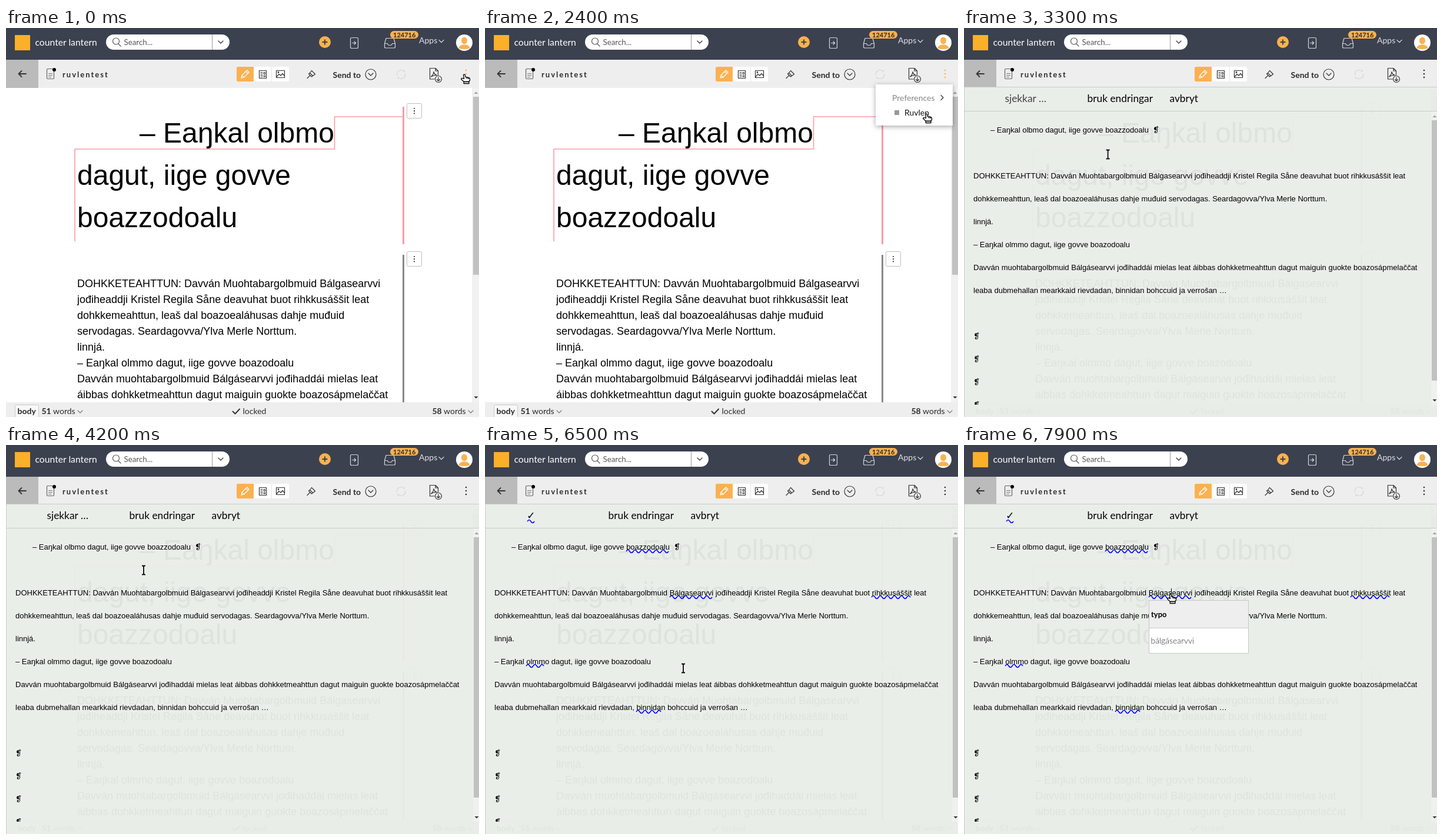
These frames come from a looping animation (804 px wide and 662 px high, 8 s). An HTML page:

```html
<!DOCTYPE html>
<html lang="se">
<head>
<meta charset="utf-8">
<title>Editor spell check</title>
<style>
html, body { margin: 0; width: 100%; height: 100%; overflow: hidden; background: #fff; }
svg { display: block; }
text { font-family: Lato, sans-serif; font-size: 14px; fill: #2b2b2b; white-space: pre; }
.line { fill: none; stroke: #333; stroke-width: 1.2; stroke-linecap: round; stroke-linejoin: round; }
.pale { stroke: #d3d5da; }
.bold { font-weight: 700; }
.page text { font: 18px "Liberation Sans", Arial, sans-serif; fill: #000; }
.page .title text { font-size: 48px; }
.check text { font: 13px "Liberation Sans", Arial, sans-serif; fill: #000; }
.check .mark { font-family: "DejaVu Sans", sans-serif; }
.check .bar { font: 13pt Lato, sans-serif; }
.menu text { fill: #858585; }
.menu rect.panel { filter: drop-shadow(0 2px 4px rgba(0,0,0,.35)); }

.timed { animation: 8s step-end infinite; }
.menu { animation-name: menu; }
.menu .first { animation-name: first; }
.menu .second { animation-name: second; }
.check { animation-name: check; }
.busy { animation-name: busy; }
.done { animation-name: done; }
.caret { animation-name: caret; }
.popup { animation-name: popup; }
.dots { animation-name: dots; }
.hand { animation-name: hand; }
.beam { animation-name: beam; }
.pulse { animation: pulse 8s ease-in-out infinite; }
.cursor { animation: move 8s linear infinite; }

@keyframes menu { 0% { visibility: hidden } 7.45% { visibility: visible } 31.2%, 100% { visibility: hidden } }
@keyframes first { 0% { fill: #858585 } 9.95% { fill: #111 } 14.95%, 100% { fill: #858585 } }
@keyframes second { 0% { fill: #858585 } 14.95%, 100% { fill: #111 } }
@keyframes check { 0% { visibility: hidden } 31.2%, 100% { visibility: visible } }
@keyframes busy { 0% { visibility: hidden } 31.2% { visibility: visible } 81.2%, 100% { visibility: hidden } }
@keyframes done { 0% { visibility: hidden } 81.2%, 100% { visibility: visible } }
@keyframes caret { 0% { visibility: hidden } 96.2%, 100% { visibility: visible } }
@keyframes popup { 0% { visibility: hidden } 97.45%, 100% { visibility: visible } }
@keyframes dots { 0% { fill: #fbb150 } 31.2%, 100% { fill: #333 } }
@keyframes hand { 0% { visibility: visible } 31.2% { visibility: hidden } 92.5%, 100% { visibility: visible } }
@keyframes beam { 0% { visibility: hidden } 31.2% { visibility: visible } 92.5%, 100% { visibility: hidden } }
@keyframes pulse { 0%, 30% { opacity: .52 } 54.4% { opacity: 1 } 79%, 100% { opacity: .52 } }
@keyframes move {
  0%, 4.5% { transform: translate(779px, 78px) }
  11.2% { transform: translate(758px, 120px) }
  15%, 15.5% { transform: translate(746px, 131px) }
  17.4%, 19.5% { transform: translate(742px, 139px) }
  21.2% { transform: translate(739px, 140px) }
  25%, 31.19% { transform: translate(750px, 145px) }
  31.2%, 32.4% { transform: translate(751px, 148px); animation-timing-function: ease-in-out }
  40% { transform: translate(249px, 214px) }
  43.7% { transform: translate(236px, 217px) }
  48.7%, 55.5% { transform: translate(234px, 213px); animation-timing-function: ease-in-out }
  63.7% { transform: translate(68px, 142px) }
  67.4% { transform: translate(78px, 136px); animation-timing-function: ease-in }
  77.4% { transform: translate(333px, 372px) }
  78.7%, 83% { transform: translate(337px, 380px); animation-timing-function: ease-in-out }
  90% { transform: translate(355px, 234px) }
  93.7%, 100% { transform: translate(351px, 253px) }
}
</style>
</head>
<body>
<svg width="804" height="662" viewBox="0 0 804 662">
  <defs>
    <path id="chevron" class="line" d="M-4-2 0 2 4-2"/>
    <g id="handle">
      <rect x=".5" y=".5" width="25" height="25" rx="2" fill="#fff" stroke="#bdbdbd"/>
      <path d="M13 9v.01M13 13.2v.01M13 17.4v.01" class="line" style="stroke-width:2.2"/>
    </g>
    <clipPath id="pageClip"><rect y="102" width="804" height="535"/></clipPath>
    <clipPath id="checkClip"><rect y="101" width="804" height="540"/></clipPath>
  </defs>
  <rect width="804" height="662" fill="#fff"/>

  <!-- document page -->
  <g class="page" clip-path="url(#pageClip)">
    <g class="title">
      <text x="227" y="195">– Eaŋkal olbmo</text>
      <text x="121" y="267">dagut, iige govve</text>
      <text x="121" y="339">boazzodoalu</text>
    </g>
    <path d="M117 363V206H558.5V151H675" fill="none" stroke="#fb9ca5" stroke-width="1.6"/>
    <path d="M675.5 134V368" stroke="#fb9ca5" stroke-width="3"/>
    <path d="M675.5 386V640" stroke="#888" stroke-width="3"/>
    <use href="#handle" x="681" y="128"/>
    <use href="#handle" x="681" y="380"/>
    <text x="121" y="441">DOHKKETEAHTTUN: Davván Muohtabargolbmuid Bálgasearvvi</text>
    <text x="121" y="468">jođiheaddji Kristel Regila Såne deavuhat buot rihkkusáššit leat</text>
    <text x="121" y="495">dohkkemeahttun, leaš dal boazoealáhusas dahje muđuid</text>
    <text x="121" y="522">servodagas. Seardagovva/Ylva Merle Norttum.</text>
    <text x="121" y="549">linnjá.</text>
    <text x="121" y="576">– Eaŋkal olmmo dagut, iige govve boazodoalu</text>
    <text x="121" y="603">Davván muohtabargolbmuid Bálgásearvvi jođihaddái mielas leat</text>
    <text x="121" y="630">áibbas dohkketmeahttun dagut maiguin guokte boazosápmelaččat</text>
    <rect x="792" y="102" width="12" height="535" fill="#f1f1f1"/>
    <rect x="794" y="117" width="10" height="303" fill="#c1c1c1"/>
    <path d="M795.5 112 799 108.5 802.5 112Z" fill="#a0a0a0"/>
    <path d="M795.5 627 799 630.5 802.5 627Z" fill="#333"/>
  </g>

  <!-- footer -->
  <rect y="637" width="804" height="25" fill="#eee"/>
  <rect x="15.5" y="641.5" width="40" height="24" rx="2" fill="#f8f8f8" stroke="#c9c9c9"/>
  <text x="19.5" y="657" class="bold">body</text>
  <text x="60.5" y="657"><tspan class="bold">51</tspan> words</text>
  <text x="402.5" y="657">locked</text>
  <text x="724.5" y="657"><tspan class="bold">58</tspan> words</text>
  <path d="M385.5 652.5 389.5 656.5 397 648.5" class="line" style="stroke-width:2"/>
  <use href="#chevron" x="126" y="653" opacity=".6"/>
  <use href="#chevron" x="790" y="653" opacity=".6"/>

  <!-- header -->
  <rect width="804" height="54" fill="#3c414f"/>
  <rect x="15" y="12" width="26" height="26" fill="#fbb029"/>
  <text x="49.5" y="30" style="font-size:15.7px;fill:#fff">counter lantern</text>
  <rect x="170" y="11" width="210" height="26" rx="13" fill="#fff"/>
  <path d="M350.5 11V37" stroke="#999"/>
  <g class="line" style="stroke:#555"><circle cx="187" cy="22.5" r="5.5"/><path d="M191 27 195 31"/></g>
  <text x="200.5" y="29" style="font-size:13.33px;fill:#555">Search...</text>
  <use href="#chevron" x="365" y="24"/>
  <circle cx="542" cy="24" r="10" fill="#fbb150"/>
  <path d="M537.5 24h9M542 19.5v9" stroke="#3c414f" stroke-width="2"/>
  <g class="line pale">
    <rect x="585.5" y="16.5" width="13" height="18" rx="2"/>
    <path d="M588.5 25.5h6M592 23l2.7 2.5-2.7 2.5"/>
    <path d="M643.5 26.5 646 17.5H659L661.5 26.5V32Q661.5 34 659.5 34H645.5Q643.5 34 643.5 32ZM643.5 26.5H648.5Q649 29.5 652.5 29.5T656.5 26.5H661.5"/>
    <path d="M736 20.5 740 24.5 744 20.5"/>
  </g>
  <rect x="653" y="5" width="48" height="13" rx="6.5" fill="#fbb150"/>
  <text x="658" y="16" class="bold" style="font-size:11px">124716</text>
  <text x="702" y="26" style="fill:#e0e1e5">Apps</text>
  <circle cx="779" cy="25" r="14" fill="#fff"/>
  <g fill="#fbb150"><ellipse cx="779" cy="21.5" rx="5" ry="6"/><path d="M769.5 34.5Q770 30 776 28.5H782Q788 30 788.5 34.5Q779 37.5 769.5 34.5Z"/></g>

  <!-- toolbar -->
  <rect y="54" width="804" height="48" fill="#eee"/>
  <rect y="54" width="55" height="48" fill="#bbb"/>
  <path d="M34 78H21.5M26.5 73 21.5 78 26.5 83" class="line" style="stroke-width:1.8"/>
  <rect x="69.5" y="69.5" width="12" height="17" rx="1.5" class="line" style="stroke:#666"/>
  <path d="M72 77.5h7M72 80.5h7M72 83.5h5" stroke="#777"/>
  <circle cx="82" cy="71" r="3" fill="#000"/>
  <text x="96" y="84" class="bold" style="font-size:13px;letter-spacing:2px">ruvlentest</text>
  <rect x="392" y="66" width="89" height="25" rx="2" fill="#fff"/>
  <path d="M394 66H421V91H394Q392 91 392 89V68Q392 66 394 66Z" fill="#fbb150"/>
  <path d="M451.5 66V91" stroke="#e4e4e4"/>
  <path d="M400 85 401 80.5 409.5 72 413 75.5 404.5 84ZM401 80.5 404.5 84M407.5 74 411 77.5" class="line" style="stroke:#fff"/>
  <g class="line">
    <rect x="430.5" y="72.5" width="12" height="13"/>
    <path d="M433 75.5h3M433 78h3M433 80.5h3M433 83h3M438.5 75.5h2v3h-2zM438.5 81h2v2h-2z" stroke-width="1"/>
    <rect x="459.5" y="72.5" width="14" height="12"/>
    <path d="M460 83 464 78.5 467 81 470 77.5 473 81"/><circle cx="463" cy="75.5" r=".8"/>
    <path d="M519.5 72.5 525.5 78.5 521.5 81.5 516.5 76.5ZM516.5 76.5 514.5 78 519.5 83 521.5 81.5M517 80.5 512 85.5"/>
    <circle cx="620" cy="79" r="9"/>
  </g>
  <text x="555.5" y="84.5" class="bold">Send to</text>
  <use href="#chevron" x="620" y="79"/>
  <path d="M664.5 80A7 7 0 0 1 677 74.5V72M678.5 78A7 7 0 0 1 666 83.5V86" class="line" style="stroke:#d6d6d6"/>
  <g class="line">
    <path d="M728 87H720.5V68.5H730L734.5 73V80M730 68.5V73H734.5"/>
    <path d="M722.5 83Q727 79 727 74.5Q728 79 732.5 80.5Q727 80 722.5 83Z"/>
    <circle cx="735" cy="87" r="5.5" fill="#eee"/>
    <path d="M735 84V90M732.5 87.7 735 90 737.5 87.7"/>
  </g>
  <g class="timed dots"><circle cx="782" cy="72" r="1.3"/><circle cx="782" cy="78" r="1.3"/><circle cx="782" cy="84" r="1.3"/></g>

  <g class="timed menu">
    <rect class="panel" x="664" y="96" width="131" height="70" fill="#fff"/>
    <text class="timed first" x="692" y="124">Preferences</text>
    <path d="M775 114.5 779 118.5 775 122.5" class="line"/>
    <rect x="696" y="140" width="8" height="8" fill="#999"/>
    <text class="timed second" x="713" y="149">Ruvlen</text>
  </g>

  <!-- spell check layer -->
  <g class="timed check">
    <rect y="101" width="804" height="561" fill="#e8eee8" fill-opacity=".955"/>
    <path d="M0 100.5H804M.5 101V662M0 141.5H804" fill="none" stroke="#c6ccc6"/>
    <g class="timed busy"><text class="bar pulse" x="69.5" y="126">sjekkar …</text></g>
    <text class="bar" x="209.5" y="126">bruk endringar</text>
    <text class="bar" x="349.5" y="126">avbryt</text>
    <g clip-path="url(#checkClip)">
      <text x="45" y="178">– Eaŋkal olbmo dagut, iige govve boazzodoalu</text>
      <text x="16" y="256">DOHKKETEAHTTUN: Davván Muohtabargolbmuid Bálgasearvvi jođiheaddji Kristel Regila Såne deavuhat buot rihkkusáššit leat</text>
      <text x="16" y="295">dohkkemeahttun, leaš dal boazoealáhusas dahje muđuid servodagas. Seardagovva/Ylva Merle Norttum.</text>
      <text x="16" y="334">linnjá.</text>
      <text x="16" y="373">– Eaŋkal olmmo dagut, iige govve boazodoalu</text>
      <text x="16" y="412">Davván muohtabargolbmuid Bálgásearvvi jođihaddái mielas leat áibbas dohkketmeahttun dagut maiguin guokte boazosápmelaččat</text>
      <text x="16" y="451">leaba dubmehallan mearkkaid rievdadan, binnidan bohccuid ja verrošan …</text>
      <text class="mark" x="321" y="178">❡</text>
      <text class="mark" x="16" y="529">❡</text>
      <text class="mark" x="16" y="568">❡</text>
      <text class="mark" x="16" y="607">❡</text>
      <text class="mark" x="16" y="646">❡</text>
    </g>
    <rect x="794" y="142" width="10" height="499" fill="#eef1ee"/>
    <rect x="795" y="157" width="9" height="443" fill="#c1c1c1"/>
    <path d="M796.5 152 800 148.5 803.5 152Z" fill="#a0a0a0"/>
    <path d="M796.5 632 800 635.5 803.5 632Z" fill="#333"/>
  </g>

  <g class="timed done">
    <text x="71" y="126" style="font:13pt 'DejaVu Sans',sans-serif;fill:#000">✓</text>
    <path id="waves" fill="none" stroke="#00f" stroke-width="1.5"/>
  </g>

  <path class="timed caret" d="M352.5 244V258" stroke="#000"/>
  <g class="timed popup">
    <rect x="314.5" y="264.5" width="169" height="90" fill="#fff" stroke="#c8c8c8"/>
    <rect x="315" y="265" width="168" height="46" fill="#eee"/>
    <path d="M315 311.5H483" stroke="#c8c8c8"/>
    <text x="318" y="293" class="bold" style="font-size:13px;fill:#000">typo</text>
    <text x="317.5" y="338" style="font-weight:300">bálgásearvvi</text>
  </g>

  <g class="cursor">
    <g class="timed hand" transform="translate(-6 0)" stroke="#000" stroke-width="1.3" stroke-linejoin="round">
      <path d="M4.5 1.8Q6 0 7.3 1.8L8 5.5 13.5 6.5Q15.5 7 15.5 9V11L13.5 13.5H5.5L1 9.5Q.3 7.5 2.5 7.5L5.5 8.5Z" fill="#fff"/>
      <path d="M10.5 6.5V8.5M13 7V9" fill="none"/>
      <rect x="5.2" y="13.5" width="8.8" height="3" fill="#fff"/>
    </g>
    <g class="timed beam" fill="none">
      <path d="M-3.5-7.5H3.5M0-7.5V7.5M-3.5 7.5H3.5" stroke="#fff" stroke-width="3.5"/>
      <path d="M-3-7.5H-1L0-6.5 1-7.5H3M0-6.5V6.5M-3 7.5H-1L0 6.5 1 7.5H3" stroke="#000" stroke-width="1.8"/>
    </g>
  </g>
</svg>
<script>
// Each squiggle: left edge, middle height, number of half waves.
const squiggles = [[72, 130, 2], [240, 181, 12], [314, 259, 12], [657, 259, 11], [70, 376, 5], [257, 454, 7]];
const wave = ([x, y, halves]) => `M${x} ${y}q3-5 6 0` + "t6 0".repeat(halves - 1);
document.getElementById("waves").setAttribute("d", squiggles.map(wave).join(""));
</script>
</body>
</html>
```
